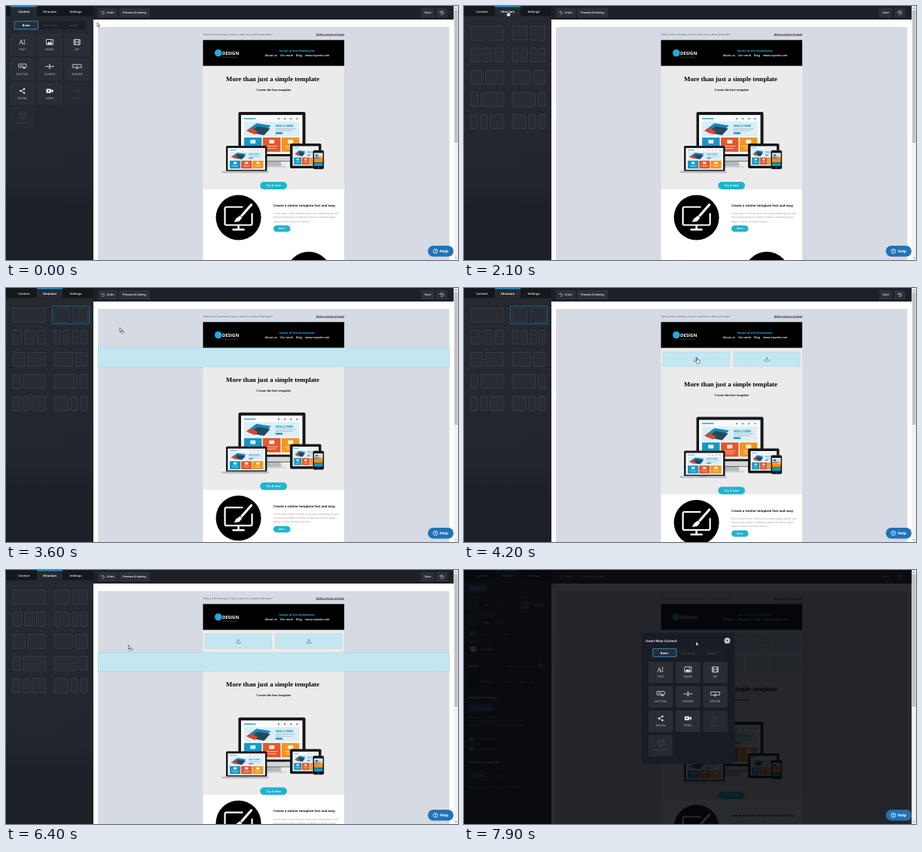
These frames come from a looping animation (600 px wide and 338 px high, 8000 ms). An HTML page with a canvas:

```html
<!DOCTYPE html>
<html lang="en">
<head>
<meta charset="utf-8">
<title>Newsletter editor</title>
<style>
html, body { margin: 0; width: 100%; height: 100%; overflow: hidden; background: #1f2228; }
canvas { display: block; width: 600px; height: 338px; }
</style>
</head>
<body>
<canvas id="stage"></canvas>
<script>
const LOOP = 8000, STEP = 100;
const UI = 'Inter, sans-serif', MAIL = '"Open Sans", sans-serif', SERIF = '"Liberation Serif", serif';
const BLUE = '#2196d3', TEAL = '#20b4cb', PURPLE = '#9b6ceb', DROP = '#c3e7f1';

const canvas = document.getElementById('stage');
const c = canvas.getContext('2d');
const dpr = window.devicePixelRatio || 1;
canvas.width = 600 * dpr;
canvas.height = 338 * dpr;

function rect(x, y, w, h, fill) {
  c.fillStyle = fill;
  c.fillRect(x, y, w, h);
}

function box(x, y, w, h, r, fill, stroke, line = 0.6) {
  c.beginPath();
  c.roundRect(x, y, w, h, r);
  if (fill) { c.fillStyle = fill; c.fill(); }
  if (stroke) { c.strokeStyle = stroke; c.lineWidth = line; c.stroke(); }
}

function disc(x, y, r, fill) {
  c.beginPath();
  c.arc(x, y, r, 0, Math.PI * 2);
  c.fillStyle = fill;
  c.fill();
}

function poly(points, fill, stroke, line = 0.6) {
  c.beginPath();
  points.forEach(([x, y]) => c.lineTo(x, y));
  c.closePath();
  if (fill) { c.fillStyle = fill; c.fill(); }
  if (stroke) { c.strokeStyle = stroke; c.lineWidth = line; c.stroke(); }
}

function path(d, stroke, line = 0.6) {
  c.strokeStyle = stroke;
  c.lineWidth = line;
  c.stroke(new Path2D(d));
}

function text(s, x, y, size, color, weight = 400, align = 'left', font = UI) {
  c.font = `${weight} ${size}px ${font}`;
  c.textAlign = align;
  c.fillStyle = color;
  c.fillText(s, x, y);
}

function at(x, y, draw) {
  c.save();
  c.translate(x, y);
  draw();
  c.restore();
}

// Cursor path: time, x, y
const moves = [
  [0, 121, 22], [700, 57.5, 6.5], [2400, 57.5, 6.5], [3100, 112, 43], [3400, 112, 43],
  [4100, 309, 93], [4500, 309, 93], [5400, 32, 62], [6200, 92, 97], [6300, 110, 98],
  [6400, 162.5, 100], [7000, 309, 120], [7300, 308, 95.5], [LOOP, 308, 95.5]
];

function cursorAt(t) {
  let i = 1;
  while (t > moves[i][0]) i++;
  const [t0, x0, y0] = moves[i - 1], [t1, x1, y1] = moves[i];
  const p = (t - t0) / (t1 - t0), e = p * p * (3 - 2 * p);
  return { x: x0 + (x1 - x0) * e, y: y0 + (y1 - y0) * e };
}

const icons = {
  TEXT(k) {
    text('A', -5, 3.2, 9, k, 400, 'left', SERIF);
    path('M2.5 -3V3M1.6 -2.2L2.5 -3.2L3.4 -2.2M1.6 2.2L2.5 3.2L3.4 2.2', k);
  },
  IMAGE(k) {
    box(-4.5, -3.5, 9, 7, 0.6, null, k, 0.8);
    poly([[-3.7, 2.7], [-1.3, -0.6], [0.3, 1.2], [1.7, -0.4], [3.7, 2.7]], k);
    disc(2, -1.6, 0.7, k);
  },
  GIF(k) {
    box(-4, -3.5, 8, 7, 0.5, null, k, 0.8);
    path('M-2 -3.5V3.5M2 -3.5V3.5M-2 0H2M-4 -1.8H-2M-4 0H-2M-4 1.8H-2M2 -1.8H4M2 0H4M2 1.8H4', k);
  },
  BUTTON(k) {
    box(-5, -3.3, 10, 4.6, 0.5, null, k, 0.8);
    path('M-3 -1H1', k, 0.8);
    poly([[1.4, -0.6], [1.4, 3.6], [2.5, 2.7], [4, 2.7]], k);
  },
  DIVIDER(k) {
    path('M-6 0H6M0 -3.5V-1M0 1V3.5', k, 0.8);
    poly([[-1.2, -2], [1.2, -2], [0, -0.7]], k);
    poly([[-1.2, 2], [1.2, 2], [0, 0.7]], k);
  },
  SPACER(k) {
    box(-6, -2.6, 12, 4, 0.4, null, k, 0.8);
    path('M0 -1.5V3.6M-1.2 2.4L0 3.6L1.2 2.4', k);
  },
  SOCIAL(k) {
    path('M2.3 -2.6L-2.3 0L2.3 2.6', k, 0.8);
    disc(2.3, -2.6, 1.2, k);
    disc(-2.3, 0, 1.2, k);
    disc(2.3, 2.6, 1.2, k);
  },
  VIDEO(k) {
    box(-4.5, -2.7, 6.3, 5.4, 0.7, k);
    poly([[1.8, -0.4], [4.5, -2.3], [4.5, 2.3], [1.8, 0.4]], k);
    poly([[-2.2, -1.4], [-2.2, 1.4], [0, 0]], '#23262d');
  },
  HTML(k) { path('M-2 -2L-4 0L-2 2M2 -2L4 0L2 2M0.8 -2.8L-0.8 2.8', k, 0.7); },
  PRODUCT(k) { path('M0 -5L4.4 -2.6V2.6L0 5L-4.4 2.6V-2.6ZM-4.4 -2.6L0 0L4.4 -2.6M0 0V5', k, 0.7); }
};

function contentGrid() {
  box(11, 20, 95, 11, 1, '#1b1e24');
  box(11.3, 20.3, 31.4, 10.6, 0.8, '#22303b', '#3aa0d0', 0.8);
  text('Basic', 27, 27.2, 3.9, '#fff', 700, 'center');
  text('Pre-made', 58.5, 27.2, 3.8, '#4a4e56', 500, 'center');
  text('Saved', 89.5, 27.2, 3.8, '#4a4e56', 500, 'center');
  Object.keys(icons).forEach((name, i) => {
    const x = 6 + i % 3 * 36.2, y = 38 + Math.floor(i / 3) * 32.5;
    const off = i > 7;
    box(x, y, 31.6, 27.6, 1, off ? '#262930' : '#292d34', off ? '#2d3138' : '#363a42', 0.5);
    at(x + 15.8, y + 10, () => icons[name](off ? '#484c54' : '#f2f3f5'));
    text(name, x + 15.8, y + 21, 3.6, off ? '#484c54' : '#c8cbd0', 400, 'center');
  });
}

const layouts = [[1], [1, 1], [1, 1, 1], [1, 1, 1, 1], [2, 3], [3, 2], [1, 3], [3, 1], [1, 1, 2], [2, 1, 1]];
const tileSpot = i => [9 + i % 2 * 55, 26 + Math.floor(i / 2) * 29.5];

function structureGrid(hovered, pressed) {
  layouts.forEach((cols, i) => {
    const [x, y] = tileSpot(i), hot = i === hovered;
    const held = hot && pressed;
    box(x - 2.5, y - 2, 49, 23.6, 1, held ? '#3d4853' : '#22252c', hot ? (held ? '#56636f' : BLUE) : '#292c33', 0.6);
    const unit = (44 - 3.5 * (cols.length - 1)) / cols.reduce((a, b) => a + b);
    let left = x;
    for (const n of cols) {
      box(left, y + 0.4, n * unit, 19, 1, '#282c33', held ? '#87919b' : '#474b53', 0.6);
      left += n * unit + 3.5;
    }
  });
}

function toggle(x, y, label) {
  box(x - 6, y - 3.5, 12, 7, 3.5, '#3a3e46');
  disc(x - 2.5, y, 3, '#777b83');
  text(label, x + 9, y + 1.3, 3.6, '#8a8e96');
}

function stepper(x, y, value) {
  box(x, y, 48, 10.5, 1, '#343841', '#444850', 0.4);
  rect(x + 12, y, 24, 10.5, '#20242a');
  text('−', x + 6, y + 6.7, 4, '#bbb', 400, 'center');
  text(value, x + 24, y + 6.7, 4, '#ddd', 500, 'center');
  text('+', x + 42, y + 6.7, 4, '#bbb', 400, 'center');
}

function settingsPanel() {
  const label = '#8a8e96';
  box(6, 20, 24, 8.5, 1, '#2a67c8');
  text('Structure', 18, 25.7, 3.8, '#dde', 500, 'center');
  text('Paddings', 7, 38, 3.6, label);
  text('Mobile', 73, 38, 3.6, label);
  stepper(6, 41.5, '5');
  box(76, 42, 11.5, 9.5, 1, '#343841', '#aaa');
  box(79, 44, 5.5, 5.5, 0.5, null, '#ddd');
  path('M94 44V49.5M106 44V49.5M94 46.8H106M97 44V49.5M100 44V49.5M103 44V49.5', '#ddd', 0.7);
  text('Left and right spacing', 7, 61, 3.6, label);
  stepper(6, 64, '0 px');
  toggle(12, 85, 'No line wrap on mobile');
  text('Background color', 7, 96, 3.6, label);
  disc(12, 105, 4, '#d8dae0');
  text('Repeated', 22, 106.5, 3.8, '#c8cbd0');
  text('Border', 6, 128.5, 4.2, '#eee', 700);
  text('More border options', 58, 128.5, 3.6, label);
  toggle(104, 127, '');
  box(6, 143, 14, 11, 1, '#111');
  text('#000000', 22, 150, 3.8, '#c8cbd0');
  text('0 px', 57, 150, 3.8, '#c8cbd0', 400, 'center');
  path('M74 149H83M88 149H94', '#bbb', 0.7);
  text('Background image', 6, 170.5, 4.2, '#eee', 700);
  box(6, 178, 34, 10.5, 1, '#24518f');
  text('Choose image', 23, 184.6, 3.8, '#ccd', 500, 'center');
  ['The image is set behind the columns of the structure.',
   'It may not be shown in some of the older mail',
   'programs, so pick a matching colour as well.'].forEach((s, i) => text(s, 6, 197 + i * 5, 3.5, label));
  toggle(12, 225, 'Repeat image');
  toggle(12, 238, 'Center image');
  text('Column\'s properties', 6, 257, 4.2, '#eee', 700);
  box(6, 268, 28, 11, 1, '#343841', '#555');
  text('Column 1', 20, 275, 3.7, '#ddd', 500, 'center');
  text('Column 2', 47, 275, 3.7, label, 400, 'center');
  text('No content here yet. Drop an item to add it', 6, 290, 3.6, label);
}

function sidePanel(view, hovered, pressed, tabHot) {
  const bg = c.createLinearGradient(0, 0, 0, 338);
  bg.addColorStop(0, '#262930');
  bg.addColorStop(0.7, '#22252b');
  bg.addColorStop(0.8, '#1d2026');
  bg.addColorStop(1, '#1d2026');
  rect(0, 0, 116, 338, bg);
  rect(0, 0, 116, 13.5, '#14171c');
  const active = view === 'content' ? 0 : 1;
  rect(active ? 41 : 6, 0, active ? 34 : 35, 13.5, '#262930');
  rect(active ? 41 : 6, 0, active ? 34 : 35, 1.3, BLUE);
  ['Content', 'Structure', 'Settings'].forEach((s, i) =>
    text(s, 23.7 + i * 34.4, 8.5, 4, i === active || (i === 1 && tabHot) ? '#fff' : '#d5d7db', 600, 'center'));
  if (view === 'content') contentGrid();
  else if (view === 'structure') structureGrid(hovered, pressed);
  else settingsPanel();
}

function undoIcon(x, y) {
  path(`M${x - 1.4} ${y - 1.2}H${x + 0.4}A1.6 1.6 0 1 1 ${x + 0.4} ${y + 2}H${x - 1}M${x - 0.5} ${y - 2.2}L${x - 1.6} ${y - 1.2}L${x - 0.5} ${y - 0.2}`, '#ddd', 0.6);
}

function topBar() {
  rect(116, 0, 478.5, 18, '#1d2027');
  [[122, 26], [150, 41], [551, 17.5], [571, 15]].forEach(([x, w]) => box(x, 2.8, w, 12.4, 1, '#2c3038'));
  undoIcon(128.5, 9);
  text('Undo', 133.5, 10.4, 3.9, '#e8e9eb', 500);
  text('Preview & testing', 170.5, 10.4, 3.7, '#e8e9eb', 600, 'center');
  text('Save', 559.8, 10.4, 3.9, '#e8e9eb', 500, 'center');
  path('M576.4 8.6A2.3 2.3 0 1 1 577 10.7M575.5 7.5L576.4 8.9L577.8 8M578.6 7.6V9.2L579.7 9.8', '#e8e9eb', 0.6);
}

// A small web page shown on each device
function webPage(x, y, w, h) {
  at(x, y, () => {
    c.scale(w / 80, h / 52);
    rect(0, 0, 80, 52, '#f7f9fa');
    rect(4, 4, 15, 1.6, '#3aa6cc');
    for (let i = 0; i < 4; i++) disc(49 + i * 8, 5, 1.1, ['#1597c5', '#e3502c'][i % 2]);
    rect(4, 9, 72, 19, '#dceef5');
    poly([[7, 21], [20, 11], [39, 14], [28, 25]], '#1787b8');
    poly([[10, 23], [22, 15], [38, 18], [30, 27]], '#25475f');
    poly([[7, 21], [13, 17], [22, 22], [18, 26]], '#d9472f');
    text('WELCOME', 45, 16, 4.4, '#1597c5', 700);
    rect(45, 18, 26, 0.8, '#a5b4bd');
    rect(45, 20.5, 22, 0.8, '#a5b4bd');
    rect(45, 23, 9, 2.4, '#1597c5');
    ['#1597c5', '#e4572a', '#f1951e'].forEach((k, i) => {
      const tx = 4 + i * 24.5;
      rect(tx, 30, 23, 19, k);
      box(tx + 8, 33, 7, 5, 1, 'rgba(255,255,255,.85)');
      rect(tx + 4, 41, 15, 0.9, 'rgba(255,255,255,.7)');
      rect(tx + 6, 44, 11, 0.9, 'rgba(255,255,255,.7)');
    });
  });
}

function devices() {
  poly([[343, 205], [364, 205], [366, 214], [341, 214]], '#b5b9bd');
  box(336, 213, 36, 2, 1, '#d0d3d6');
  box(308.5, 141, 89, 66, 2, '#15171a');
  rect(309, 200, 88, 6.5, '#d3d6d9');
  webPage(312, 145, 81.5, 52);
  box(292, 186, 54.5, 34, 1.6, '#1b1d20');
  webPage(294.5, 189, 49.5, 29);
  box(286.5, 219.5, 62, 2.8, 1.2, '#b9bdc1');
  rect(311, 219.5, 13, 0.9, '#8d9296');
  box(377, 183, 41.5, 33, 2, '#15171a');
  webPage(380.5, 186.5, 34.5, 26);
  box(407.5, 192, 14.5, 25, 2, '#0d0e10', '#777', 0.4);
  webPage(409, 195.5, 11.5, 8);
  ['#f1951e', '#1597c5'].forEach((k, i) => rect(409, 203.5 + i * 5, 11.5, 4.5, k));
  disc(414.7, 215, 0.9, '#555');
}

function pill(x, y, w, h, label, size) {
  box(x, y, w, h, h / 2, TEAL);
  text(label, x + w / 2, y + h / 2 + size * 0.36, size, '#fff', 600, 'center', MAIL);
}

function paintIcon(x, y) {
  disc(x, y, 30, '#000');
  at(x, y, () => {
    c.lineCap = 'round';
    path('M5 -14H-16Q-18 -14 -18 -12V8Q-18 10 -16 10H16Q18 10 18 8V-5', '#fff', 2.2);
    path('M-7 16H7M0 11V15', '#fff', 2.6);
    path('M17 -17L3 -1', '#fff', 3.2);
    poly([[2, -2.5], [5, 0], [1, 5], [-6, 6], [-3, 1]], '#fff');
    path('M2.2 -2.8L5.4 0.2', '#000', 0.8);
    c.lineCap = 'butt';
  });
}

function mailHead() {
  text('Write a short summary of your e-mail, the so-called "preheader"', 262, 38.5, 3.1, '#4a4d52', 400, 'left', MAIL);
  text('Online version of email', 449, 38.5, 3.35, '#111', 600, 'right', MAIL);
  rect(411, 39.2, 38, 0.4, '#111');
  rect(261.5, 45.3, 187.5, 34.5, '#000');
  disc(281.8, 62.5, 4.8, '#25a9dd');
  text('DESIGN', 287, 65.2, 6, '#fff', 700, 'left', MAIL);
  text('YOUR SLOGAN TEXT', 287.3, 68.6, 2.1, '#999', 400, 'left', MAIL);
  text('Name of the Newsletter', 386.5, 60.8, 3.95, '#1ba9e1', 700, 'center', MAIL);
  [['About us', 343.5], ['Our work', 364], ['Blog', 385], ['www.myweb.com', 397]].forEach(([s, x]) =>
    text(s, x, 67, 3.8, '#fff', 600, 'left', MAIL));
}

function mailBody() {
  rect(261.5, 79.8, 187.5, 164.5, '#ebebeb');
  rect(261.5, 244, 187.5, 200, '#fff');
  text('More than just a simple template', 354, 100, 8.77, '#000', 700, 'center', SERIF);
  text('Create the best template', 355.4, 113, 4.4, '#111', 700, 'center', SERIF);
  devices();
  pill(337.3, 234, 35.7, 10, 'Try it now', 4.05);
  paintIcon(308.6, 281.5);
  text('Create a similar template fast and easy', 355, 267, 4.2, '#111', 700, 'left', MAIL);
  ['Lorem ipsum dolor sit amet, consectetur adipiscing elit, sed',
   'do eiusmod tempor incididunt ut labore et dolore magna',
   'aliqua. Ut enim ad minim veniam.'].forEach((s, i) =>
    text(s, 355, 277.3 + i * 5.1, 3.12, '#888', 400, 'left', MAIL));
  pill(355, 292, 22.5, 8.5, 'More', 3.4);
  disc(402, 357, 30, '#000');
}

function dropRow(y, split, hot) {
  rect(261.5, y, 187.5, 31, '#ebebeb');
  const w = 176 * split;
  [[264.3, w], [270 + w, 176 - w]].forEach(([x, width], i) => {
    const lit = hot && i === 0;
    box(x, y + 5.3, width, 19.2, 0, lit ? '#b9e6f3' : DROP);
    c.setLineDash([1, 0.7]);
    box(x, y + 5.3, width, 19.2, 0, null, '#8fbac6', 0.5);
    c.setLineDash([]);
    const k = lit ? '#333' : '#85959b';
    at(x + width / 2, y + 15, () => {
      path('M-3 0.6V2.7H3V0.6', k, 0.9);
      path('M0 -3V0', k, 1.5);
      poly([[-1.9, -0.6], [1.9, -0.6], [0, 1.5]], k);
    });
  });
}

function dropBar(y) {
  box(122, y, 466.5, 25, 0, DROP);
  c.setLineDash([1, 0.8]);
  box(122, y, 466.5, 25, 0, null, '#7fc4dc', 0.6);
  c.setLineDash([]);
}

function rowTools() {
  path('M122 79.7H588.5M122 110.2H588.5', '#a783ea', 0.7);
  path('M122 79.7V110.2M588.5 79.7V110.2', '#c3aeea', 0.5);
  [72.2, 110.2].forEach(y => {
    box(131.3, y, 7.4, 7.2, 0.8, PURPLE);
    path(`M133.2 ${y + 3.6}H136.8M135 ${y + 1.8}V${y + 5.4}`, '#fff', 0.6);
  });
  box(573.3, 74.3, 15.2, 5.4, 0.6, PURPLE);
  text('Structure', 580.9, 78, 2.8, '#fff', 500, 'center');
  disc(122.5, 95, 4.7, '#33363c');
  path('M119.6 95H125.4M122.5 92.1V97.9', '#fff', 0.7);
  [91, 100.2].forEach(y => disc(588.5, y, 4.4, '#33363c'));
  path('M587 89.5L590 92.5M590 89.5L587 92.5', '#fff', 0.8);
  box(586.8, 99.4, 2.6, 2.6, 0.3, null, '#fff', 0.6);
  path('M588 98.4H590.4V100.8', '#fff', 0.6);
}

function modal() {
  box(236, 83.7, 123.4, 174.3, 1.5, '#181c24');
  text('Insert New Content', 241.3, 95.5, 4.45, '#fff', 600);
  disc(349.4, 93.9, 3.9, '#c9ccd1');
  path('M348.2 92.7L350.6 95.1M350.6 92.7L348.2 95.1', '#181c24', 0.8);
  at(239.3, 84.4, contentGrid);
}

function helpButton() {
  box(560, 319, 34, 14.5, 7.2, '#1f73b7');
  c.beginPath();
  c.arc(570, 326.3, 2.9, 0, Math.PI * 2);
  c.strokeStyle = '#fff';
  c.lineWidth = 0.8;
  c.stroke();
  text('?', 570, 328, 4.4, '#fff', 700, 'center');
  text('Help', 575.7, 328.3, 5.1, '#fff', 700);
}

function scrollbar() {
  rect(594.5, 0, 5.5, 338, '#f1f1f1');
  rect(595.2, 5.5, 4.2, 176.5, '#c1c1c1');
  poly([[596, 3.5], [598.6, 3.5], [597.3, 2]], '#555');
  poly([[596, 334.5], [598.6, 334.5], [597.3, 336]], '#888');
}

function arrow() {
  poly([[0, 0], [0, 5.4], [1.3, 4.2], [2.1, 6], [3, 5.6], [2.2, 3.9], [3.9, 3.8]], '#fff', '#000', 0.5);
}

function hand() {
  c.lineJoin = 'round';
  poly([[0, 0], [1, 0], [1.1, 2.6], [4, 3.2], [4.2, 5.2], [3.5, 7.4], [0.2, 7.4], [-1.8, 4.4], [-1.2, 3.9], [-0.1, 5]], '#fff', '#000', 0.5);
  c.lineJoin = 'miter';
}

function drawCursor({ x, y }, kind) {
  at(x, y, () => {
    if (kind === 'hand') hand();
    else arrow();
    if (kind === 'drag') box(1.8, 4.6, 3.6, 2.4, 0.3, '#fff', '#222', 0.5);
  });
}

function draw(t) {
  const p = cursorAt(t);
  const view = t < 2100 ? 'content' : t < 7800 ? 'structure' : 'settings';
  const dragging = (t >= 3500 && t < 4200) || (t >= 6400 && t < 7000);
  const rows = (t >= 4200) + (t >= 7000);
  const barOn = dragging && p.x > 122;
  const rowHot = t >= 4600 && !dragging && p.x > 122 && p.y > 80 && p.y < 110 && t < 7800;
  const overTab = p.x > 41 && p.x < 75 && p.y < 13;

  let hovered = -1;
  if (t >= 3500 && t <= 4200) hovered = 1;
  else if (!dragging) hovered = layouts.findIndex((_, i) => {
    const [x, y] = tileSpot(i);
    return p.x > x - 2 && p.x < x + 49 && p.y > y - 2 && p.y < y + 22;
  });

  c.setTransform(dpr, 0, 0, dpr, 0, 0);
  c.textRendering = 'geometricPrecision';
  rect(0, 0, 600, 338, '#fff');
  rect(122, 28, 466.5, 310, '#d5dae3');
  mailHead();
  at(0, rows * 30.5 + (barOn ? 24.7 : 0), mailBody);
  if (rows > 0) dropRow(79.8, 0.5, rowHot && rows > 1);
  if (rows > 1) dropRow(110.3, 0.605, false);
  if (barOn) dropBar(rows ? 110 : 79.8);
  if (rowHot) rowTools();
  topBar();
  sidePanel(view, hovered, t === 3400, overTab);

  if (t >= 7800) {
    c.globalAlpha = t < 7900 ? 0.5 : 1;
    rect(0, 0, 594.5, 338, 'rgba(6,8,11,.86)');
    modal();
    c.globalAlpha = 1;
  }
  scrollbar();
  helpButton();

  const overBox = rows > 0 && p.x > 264 && p.x < 352 && p.y > 85 && p.y < 105 && t < 7800;
  drawCursor(p, dragging ? 'drag' : overTab || overBox ? 'hand' : 'arrow');
}

const start = performance.now();
function tick(now) {
  const t = Math.max(0, now - start) % LOOP;
  draw(Math.floor(t / STEP) * STEP);
  requestAnimationFrame(tick);
}
draw(0);
requestAnimationFrame(tick);
</script>
</body>
</html>
```
